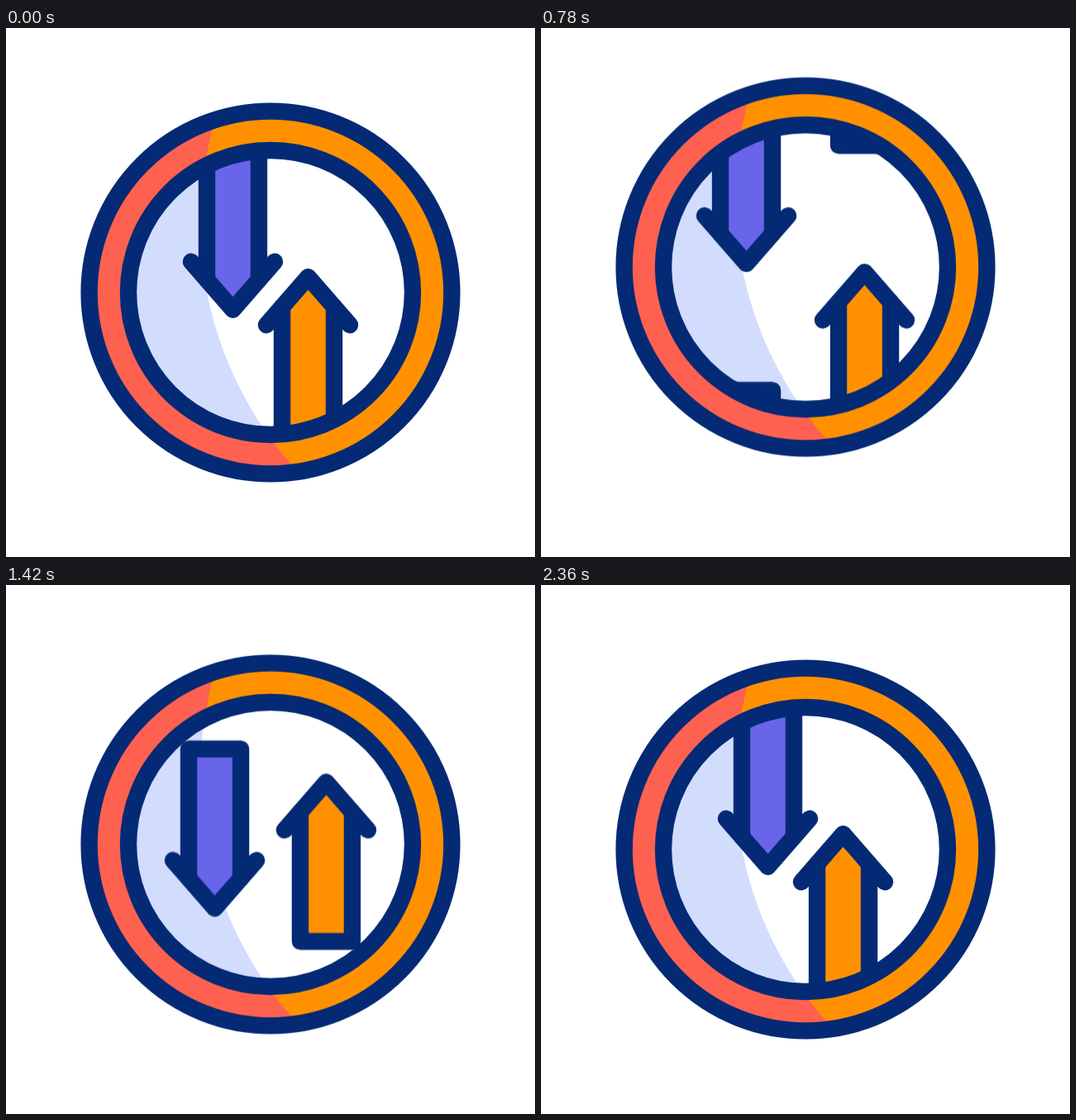
These frames come from a looping animation (640 by 640 pixels, 2420 ms). An HTML page without scripts:

```html
<!DOCTYPE html>
<html lang="en">
<head>
<meta charset="utf-8">
<title>Two-way arrows badge</title>
<style>
  html, body { margin: 0; width: 100%; height: 100%; overflow: hidden; background: #fff; }
  svg { display: block; width: 100vw; height: 100vh; }

  .badge, .sway, .run {
    animation: 2420ms infinite cubic-bezier(.333, 0, .667, 1);
  }
  .badge { animation-name: bounce; }
  .sway { animation-name: sway; }
  .run { animation-name: run; }

  .line {
    fill: none;
    stroke: #042a75;
    stroke-width: 20.4;
    stroke-linecap: round;
    stroke-linejoin: round;
  }
  .orange { fill: #ff9100; }
  .purple { fill: #6865eb; }
  .band { fill: none; stroke-width: 30; }

  @keyframes bounce {
    0%, 8.264% { transform: translateY(0); }
    16.529% { transform: translateY(56.5px); animation-timing-function: cubic-bezier(.33, 0, .67, .755); }
    30.579% { transform: translateY(-23px); animation-timing-function: cubic-bezier(.33, .35, .67, 1); }
    42.975% { transform: translateY(-72px); }
    52.893% { transform: translateY(49.5px); }
    62.81% { transform: translateY(-39px); }
    72.727% { transform: translateY(22px); }
    97.521%, 100% { transform: translateY(0); }
  }

  /* the arrows drift apart, then close up again */
  @keyframes sway {
    0%, 8.264% { transform: translateX(0); }
    23.14%, 52.893% { transform: translateX(26px); }
    76.033%, 100% { transform: translateX(0); }
  }

  /* two full passes, an overshoot and a return */
  @keyframes run {
    0%, 15.702% { transform: translateY(0); animation-timing-function: cubic-bezier(.33, 0, .67, .6); }
    32.231% { transform: translateY(-320px); animation-timing-function: cubic-bezier(.33, .4, .67, .81); }
    47.934% { transform: translateY(-685.5px); animation-timing-function: cubic-bezier(.33, .7, .67, 1); }
    57.851% { transform: translateY(-749px); }
    76.033%, 100% { transform: translateY(-692px); }
  }
</style>
</head>
<body>
<svg viewBox="0 0 640 640">
  <defs>
    <clipPath id="shade"><path d="M80 90H259.5A444 444 0 0 0 376.1 560H80Z"/></clipPath>
    <clipPath id="hole"><circle cx="320" cy="320" r="172"/></clipPath>
    <g id="arrow">
      <path d="M365.5 301.3L397 337.5V494H334V337.5Z"/>
      <path class="line" d="M334 337.5V494H397V337.5"/>
      <path class="line" d="M315 359.3L365.5 301.3L416 359.3"/>
    </g>
    <g id="column">
      <use href="#arrow"/>
      <use href="#arrow" y="346"/>
      <use href="#arrow" y="692"/>
    </g>
  </defs>

  <g class="badge">
    <circle class="band" cx="320" cy="320" r="195.7" stroke="#ff9100"/>
    <g clip-path="url(#shade)">
      <circle class="band" cx="320" cy="320" r="195.7" stroke="#ff6150"/>
      <circle cx="320" cy="320" r="170" fill="#d2dcfd"/>
    </g>
    <g clip-path="url(#hole)">
      <g class="purple" transform="rotate(180 320 321)">
        <g class="sway"><g class="run"><use href="#column"/></g></g>
      </g>
      <g class="orange">
        <g class="sway"><g class="run"><use href="#column"/></g></g>
      </g>
    </g>
    <circle class="line" cx="320" cy="320" r="172"/>
    <circle class="line" cx="320" cy="320" r="219.4"/>
  </g>
</svg>
</body>
</html>
```
